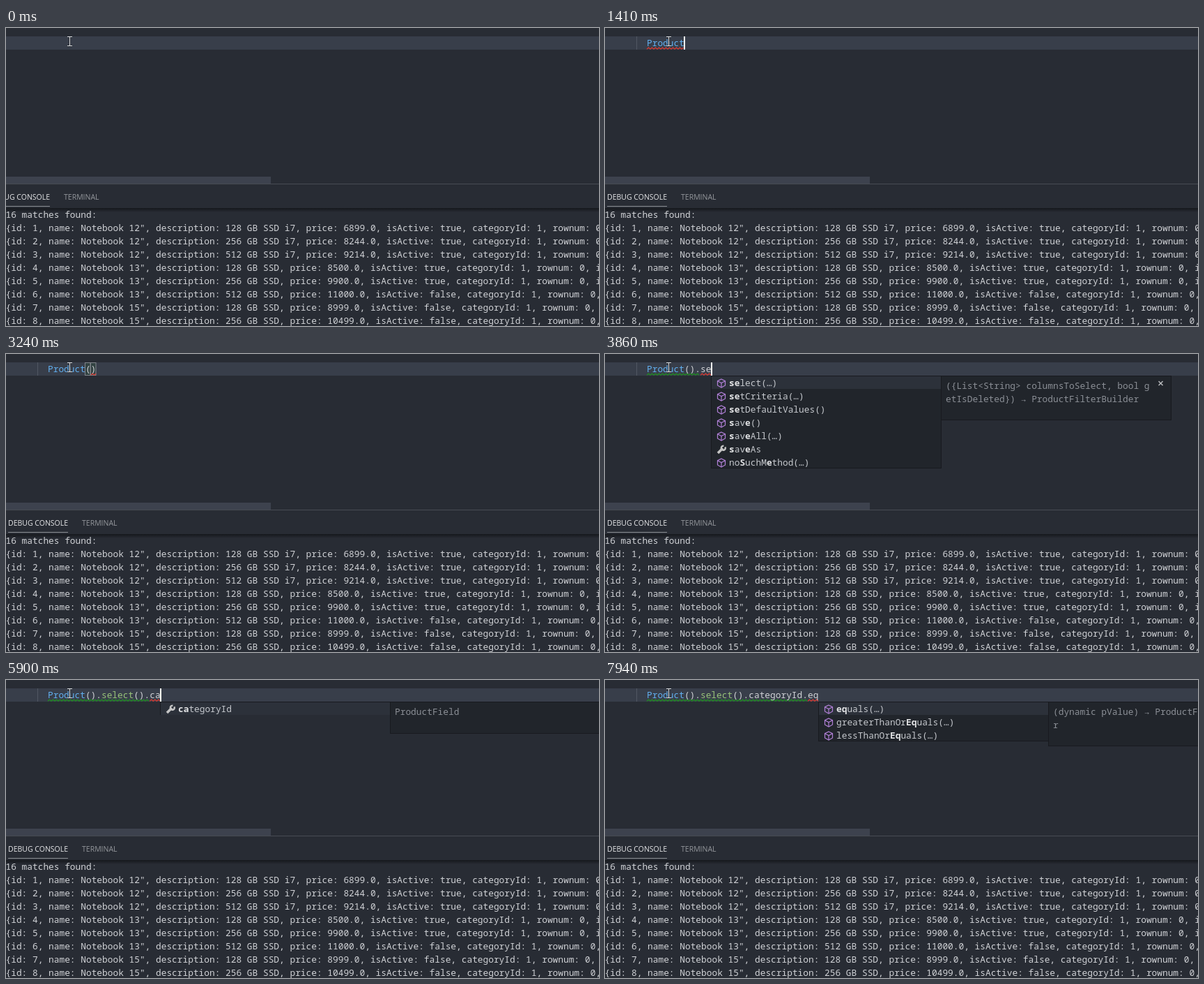
An HTML page with a canvas for the animation above (8 s loop, 851 by 427 pixels).

```html
<!DOCTYPE html>
<html lang="en">
<head>
<meta charset="utf-8">
<title>Editor autocomplete</title>
<style>
  html, body { margin: 0; width: 100%; height: 100%; overflow: hidden; background: #282c34; }
  canvas { display: block; }
</style>
</head>
<body>
<canvas id="stage" width="851" height="427"></canvas>
<script>
const ctx = document.getElementById('stage').getContext('2d');
const LOOP = 8000, LEFT = 60, CHAR = 7.698, ROW = 19, PANE = 330;
const MONO = '12.83px "Noto Sans Mono", monospace';
const UI = '10.5px "Open Sans", sans-serif';
const RED = '#e8392f', GREEN = '#1d951d', TEXT = '#d0d2d6';

// Row markup: first letter picks the icon, asterisks enclose the bold match.
const list = (rows, note, thumb) => ({ rows: rows.split('|'), note, thumb });
const classes = match => list(
  ['Product', 'ProductField', 'ProductFields', 'ProductFilterBuilder', 'ProductManager',
   'ProductController', 'ProductToJson', 'ProductFromMap', 'ProductSearch', 'ProductTable',
   'ProductView', 'ProductList'].map(n => `c*${match}*${n.slice(match.length)}`).join('|'),
  ['({int id, String name, String descript', 'ion, double price}) → Product'], [32, 90]);

const lists = {
  pr: classes('Pr'),
  prod: classes('Prod'),
  args: list('pcategoryId: |pdescription: |pid: |pisActive: |pisDeleted: |pname: |pprice: |prownum: ', ['int']),
  product: list('mselect(…)|msetCriteria(…)|msetDefaultValues()|mtoMap(…)|mtoMapForeign(…)|mtoString()|' +
    'mupsertAll(…)|fcategoryId|fdescription|fid|fisActive|fname',
    ['({List<String> columnsToSelect, bool g', 'etIsDeleted}) → ProductFilterBuilder'], [100, 96]),
  se: list('m*se*lect(…)|m*se*tCriteria(…)|m*se*tDefaultValues()|m*s*av*e*()|m*s*av*e*All(…)|p*s*av*e*As|mno*S*uchM*e*thod(…)',
    ['({List<String> columnsToSelect, bool g', 'etIsDeleted}) → ProductFilterBuilder']),
  builder: list('pand|pcategoryId|mdelete(…)|pdescription|mdistinct(…)|pendBlock|mequals(…)|' +
    'mgroupBy(…)|phashCode|pid|pisActive|pname', ['ProductFilterBuilder'], [32, 96]),
  ca: list('p*ca*tegoryId', ['ProductField']),
  field: list('mequals(…)|mgreaterThan(…)|mgreaterThanOrEquals(…)|fgroupByList|phashCode|minValues(…)|' +
    'misNull()|mlessThan(…)|mlessThanOrEquals(…)|mnoSuchMethod(…)|pnot|fparam',
    ['(dynamic pValue) → ProductFilterBuilde', 'r'], [62, 118]),
  e: list('m*e*quals(…)|m*e*ndsWith(…)|mgreaterThanOr*E*quals(…)|mlessThanOr*E*quals(…)',
    ['(dynamic pValue) → ProductFilterBuilde', 'r']),
  eq: list('m*eq*uals(…)|mgreaterThanOr*Eq*uals(…)|mlessThanOr*Eq*uals(…)',
    ['(dynamic pValue) → ProductFilterBuilde', 'r'])
};

// Each step keeps the values of the one before it.
const off = { lit: false };
const steps = [
  [0, { text: '', col: 0, lit: false, docked: false }],
  [200, { lit: true }],
  [400, { text: 'P', col: 1, docked: true, red: [0, 1] }],
  [800, { text: 'Pr', col: 2, red: [0, 2], popup: 'pr' }],
  [1000, { text: 'Prod', col: 4, red: [0, 4], popup: 'prod' }],
  [1410, { text: 'Product', col: 7, red: [0, 7], popup: null }],
  [1840, off],
  [2020, { text: 'Product()', col: 8, lit: true, red: [8, 9], pair: 7, popup: 'args' }],
  [2440, off],
  [2840, { col: 9, lit: true, popup: null }],
  [3240, off],
  [3660, { text: 'Product().', col: 10, lit: true, red: null, pair: null, popup: 'product' }],
  [3860, { text: 'Product().se', col: 12, green: [0, 10], red: [10, 12], popup: 'se' }],
  [4260, off],
  [4460, { text: 'Product().select()', col: 17, lit: true, green: null, red: [17, 18], pair: 16, popup: null }],
  [4880, off],
  [5280, { col: 18, lit: true }],
  [5480, { text: 'Product().select().', col: 19 }],
  [5700, { red: null, pair: null, popup: 'builder' }],
  [5900, { text: 'Product().select().ca', col: 21, green: [0, 19], red: [19, 21], popup: 'ca' }],
  [6500, { text: 'Product().select().categoryId', col: 29, green: null, red: [19, 29], popup: null }],
  [6920, { text: 'Product().select().categoryId.', col: 30, red: null, popup: 'field' }],
  [7320, { text: 'Product().select().categoryId.e', col: 31, green: [0, 30], red: [30, 31], popup: 'e' }],
  [7520, { text: 'Product().select().categoryId.eq', col: 32, red: [30, 32], popup: 'eq' }],
  [7940, off]
];

const products = [
  ['12"', '128 GB SSD i7', 6899, true], ['12"', '256 GB SSD i7', 8244, true],
  ['12"', '512 GB SSD i7', 9214, true], ['13"', '128 GB SSD', 8500, true],
  ['13"', '256 GB SSD', 9900, true], ['13"', '512 GB SSD', 11000, false],
  ['15"', '128 GB SSD', 8999, false], ['15"', '256 GB SSD', 10499, false]
];
const output = ['16 matches found:', ...products.map(([size, about, price, active], i) =>
  `{id: ${i + 1}, name: Notebook ${size}, description: ${about}, price: ${price}.0, ` +
  `isActive: ${active}, categoryId: 1, rownum: 0, isDeleted: false}`)];

function rect(x, y, w, h, color) {
  ctx.fillStyle = color;
  ctx.fillRect(x, y, w, h);
}
function label(text, x, y, color, font = MONO) {
  ctx.font = font;
  ctx.fillStyle = color;
  ctx.fillText(text, x, y);
}
function line(points, color, width = 1, close = false) {
  ctx.beginPath();
  points.forEach(([x, y]) => ctx.lineTo(x, y));
  if (close) ctx.closePath();
  ctx.strokeStyle = color;
  ctx.lineWidth = width;
  ctx.stroke();
}
function shape(points, color) {
  ctx.beginPath();
  points.forEach(([x, y]) => ctx.lineTo(x, y));
  ctx.fillStyle = color;
  ctx.fill();
}
const columnX = col => LEFT + col * CHAR;

function squiggle(range, color) {
  if (!range) return;
  const from = columnX(range[0]), to = columnX(range[1]), points = [];
  for (let x = from, up = 0; x <= to; x += 2.5, up ^= 1) points.push([x, up ? 28 : 30.3]);
  line(points, color, 1.1);
}

const icons = {
  m() {
    const c = '#b180d7';
    line([[0, -6], [5.5, -3.3], [5.5, 3], [0, 6], [-5.5, 3], [-5.5, -3.3]], c, 1.2, true);
    line([[-5.5, -3.3], [0, -.4], [5.5, -3.3]], c, 1.2);
    line([[0, -.4], [0, 6]], c, 1.2);
  },
  f() {
    shape([[-7, -1], [1, -5], [7, -2], [7, 2], [-1, 5.5], [-7, 3]], '#75beff');
    line([[-6, -.5], [-1, 1.7], [6, -1.7]], '#3f759f', .8);
  },
  p() {
    line([[-5, 5], [2, -2]], '#c5c5c5', 3.6);
    ctx.beginPath();
    ctx.arc(2.8, -2.3, 3, -.5, 4.9);
    ctx.lineWidth = 2.4;
    ctx.stroke();
  },
  c() {
    line([[-5, -1], [-1, -5], [2, -2], [-2, 2], [-5, -1]], '#ee9d28', 1.5);
    line([[0, 0], [5, 0], [5, 4], [1, 4], [1, 0]], '#ee9d28', 1.3);
  }
};

function box(x, y, w, h) {
  rect(x, y, w, h, '#181a1f');
  rect(x + 1, y + 1, w - 2, h - 2, '#21252b');
}

function drawPopup({ rows, note, thumb }, x) {
  const height = Math.min(rows.length * ROW, 227);
  box(x + PANE - 1, 31, PANE + 1, 28 + note.length * 18);
  note.forEach((s, i) => label(s, x + PANE + 6, 50 + i * ROW, '#8b8f96'));
  const cx = x + PANE + 314.5;
  line([[cx - 3, 39], [cx + 3, 45]], '#b8babd', 1.5);
  line([[cx + 3, 39], [cx - 3, 45]], '#b8babd', 1.5);

  box(x - 1, 31, PANE + 1, height);
  rect(x, 32, PANE - 1, ROW - 1, '#2c313a');
  ctx.save();
  ctx.beginPath();
  ctx.rect(x, 32, PANE, height - 2);
  ctx.clip();
  rows.forEach((row, i) => {
    ctx.save();
    ctx.translate(x + 14, 42 + i * ROW);
    icons[row[0]]();
    ctx.restore();
    let tx = x + 25;
    row.slice(1).split('*').forEach((part, k) => {
      label(part, tx, 46 + i * ROW, k % 2 ? '#e4e5e7' : '#c5c8cd', (k % 2 ? 'bold ' : '') + MONO);
      tx += part.length * CHAR;
    });
  });
  if (thumb) rect(x + 319, thumb[0], 10, thumb[1], '#3a3f4a');
  ctx.restore();
}

function drawCode(s) {
  rect(0, 12, 851, 19, '#383e4a');
  if (s.docked) rect(45, 12, 1, 19, '#505663');
  if (s.pair != null) {
    for (const col of [s.pair, s.pair + 1]) {
      const x = Math.floor(columnX(col)) + .5;
      ctx.fillStyle = 'rgba(0,100,0,.1)';
      ctx.fillRect(x, 12.5, 7.5, 18);
      ctx.strokeStyle = '#80848b';
      ctx.lineWidth = 1;
      ctx.strokeRect(x, 12.5, 7.5, 18);
    }
  }
  squiggle(s.green, GREEN);
  squiggle(s.red, RED);
  let col = 0;
  for (const word of s.text.match(/\w+|\W+/g) || []) {
    const color = col === 0 ? '#61afef' : word === 'select' ? '#98c379' : TEXT;
    label(word, columnX(col), 26, color);
    col += word.length;
  }
  if (s.lit) rect(Math.floor(columnX(s.col) - .05), 12, 2, 19, '#f8f8f0');
}

function drawPointer() {
  const strokes = [[[88, 12.5], [95, 12.5]], [[91.5, 12], [91.5, 26]], [[88, 25.5], [95, 25.5]]];
  strokes.forEach(p => line(p, '#20232a', 2.4));
  strokes.forEach(p => line(p, '#d8dade', 1.1));
}

function drawPanel(docked) {
  const shift = docked ? 0 : -26;
  rect(0, 213, 380, 10, '#3d424e');
  rect(0, 223, 851, 1, '#474b53');
  label('DEBUG CONSOLE', 3 + shift, 246, '#e4e5e7', UI);
  label('TERMINAL', 109 + shift, 246, '#94979c', UI);
  rect(3 + shift, 255, 86, 1, '#8d9096');
  const shadow = ctx.createLinearGradient(0, 258, 0, 264);
  shadow.addColorStop(0, 'rgba(18,20,24,.85)');
  shadow.addColorStop(1, 'rgba(18,20,24,0)');
  rect(0, 258, 851, 6, shadow);
  output.forEach((row, i) => label(row, -.5, 272 + i * ROW, TEXT));
}

function frame(now) {
  const t = now % LOOP;
  const s = Object.assign({}, ...steps.filter(([at]) => at <= t).map(([, change]) => change));
  rect(0, 0, 851, 427, '#282c34');
  drawCode(s);
  drawPanel(s.docked);
  if (s.popup) drawPopup(lists[s.popup], Math.ceil(columnX(s.col)));
  drawPointer();
  requestAnimationFrame(frame);
}
requestAnimationFrame(frame);
</script>
</body>
</html>
```
